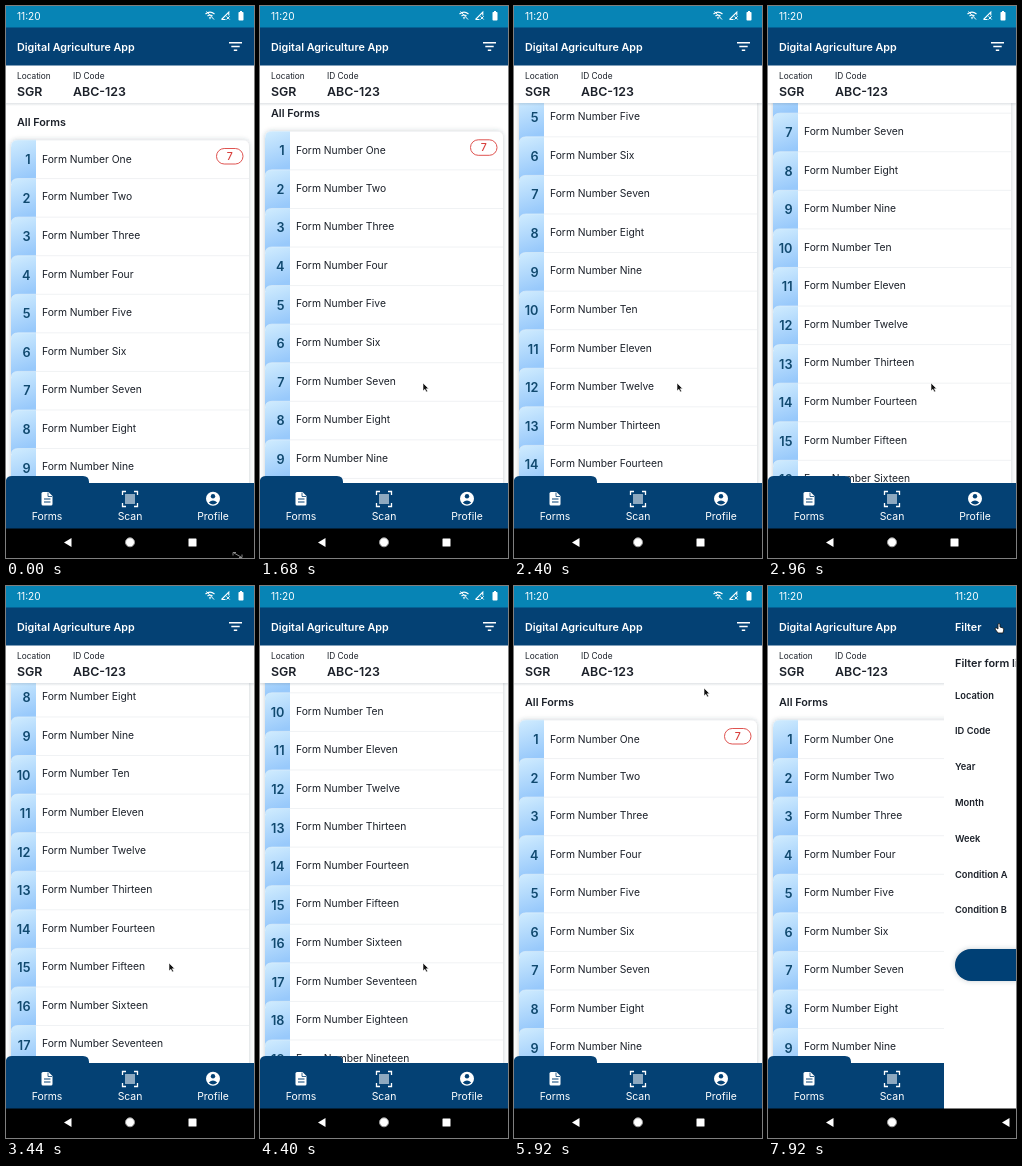
Recreate the animation shown at these times as an HTML page. Size 248 by 552 pixels, loop 8 s.

```html
<!DOCTYPE html>
<html lang="en">
<head>
<meta charset="utf-8">
<style>
html, body { margin: 0; width: 100%; height: 100%; overflow: hidden; background: #fff; }
svg { display: block; width: 248px; height: 552px; font-family: Inter, Roboto, sans-serif; }
.b { font-weight: 600; }
</style>
</head>
<body>
<svg id="stage" viewBox="0 0 248 552"></svg>
<script>
const LOOP = 8000, STEP = 80, PITCH = 38.57;
const NAVY = '#044174', INK = '#1b2029';
const names = ('One Two Three Four Five Six Seven Eight Nine Ten Eleven Twelve Thirteen ' +
  'Fourteen Fifteen Sixteen Seventeen Eighteen Nineteen Twenty').split(' ');

const text = (x, y, size, str, fill = INK, more = '') =>
  `<text x="${x}" y="${y}" font-size="${size}" fill="${fill}" ${more}>${str}</text>`;
const bold = (x, y, size, str, fill = INK, more = '') =>
  text(x, y, size, str, fill, 'class="b" ' + more);
const rect = (x, y, w, h, fill, more = '') =>
  `<rect x="${x}" y="${y}" width="${w}" height="${h}" fill="${fill}" ${more}/>`;
const path = (d, fill, more = '') => `<path d="${d}" fill="${fill}" ${more}/>`;
const line = (d, width, color = '#fff') =>
  path(d, 'none', `stroke="${color}" stroke-width="${width}"`);

function row(name, i) {
  const y = 134 + i * PITCH;
  return rect(30, y - .5, 213, 1, '#f0f2f4') +
    path(`M5 ${y + 44}V${y + 7}q0-7 7-7H30V${y + 44}Z`, 'url(#blue)') +
    line(`M5 ${y + 7}q0-7 7-7H30`, .7, '#dcecfa') +
    bold(24.5, y + 24, 12.7, i + 1, '#10496f', 'text-anchor="end"') +
    text(36, y + (i ? 21.8 : 22.8), 10.3, 'Form Number ' + name);
}

const card = rect(5, 134, 238, PITCH * names.length, '#fff', 'rx="6" filter="url(#glow)"');

const topBars = title =>
  rect(0, 0, 248, 22, '#0784b5') + rect(0, 21.5, 248, 38, NAVY) +
  text(11, 13.6, 10.1, '11:20', '#fff') +
  line('M199.500 8q4.500-3.600 9 0M201.500 10q2.500-2 5 0', 1.2) +
  path('M202.800 11.200h2.400L204 13.500Z', '#fff') + line('M200.500 5.500l7.500 8', 1) +
  line('M215.500 13.500L222.800 6V9.500M215.500 13.500H219.500', 1.1) +
  line('M220.500 10.300l3.200 3.200m0-3.200l-3.200 3.200', 1) +
  rect(232.5, 6, 5, 8.5, '#fff', 'rx=".8"') + rect(234, 5, 2, 1.5, '#fff') +
  bold(11, 44.7, 10.75, title, '#fff');

const systemBar = rect(0, 522.5, 248, 30, '#000') +
  path('M58 536.5L65.5 532V541Z', '#fff') +
  '<circle cx="124" cy="536.3" r="4.5" fill="#fff" stroke="#999" stroke-width="1"/>' +
  rect(182.5, 532.5, 8, 8, '#fff', 'rx=".6"');

const tabLabel = (x, str) => text(x, 513.7, 10.4, str, '#fff', 'text-anchor="middle"');

const tabs = rect(0, 477, 248, 46, NAVY) +
  path('M0 523V474q1-4 6-4H77q6 0 6 6V523Z', NAVY) +
  path('M37 486h5.5l4 4v8q0 1.5-1.5 1.5h-8q-1.5 0-1.5-1.5V487.5q0-1.5 1.5-1.5Z', '#fff') +
  line('M38 493h6.5M38 496h6.5', 1.1, NAVY) + line('M42 486.5v4h4', .8, NAVY) +
  line('M116.5 489v-3.5h3.5M128 485.5h3.5V489M131.5 497v3.5H128M120 500.5h-3.5V497', 1.3) +
  rect(119, 488, 10, 10, '#fff', 'opacity=".55"') +
  '<circle cx="207" cy="492.7" r="7" fill="#fff"/>' +
  `<circle cx="207" cy="490.3" r="2.2" fill="${NAVY}"/>` +
  path('M202.8 496.4q4.2-4 8.4 0q-4.2 4-8.4 0Z', NAVY) +
  tabLabel(41, 'Forms') + tabLabel(124, 'Scan') + tabLabel(207, 'Profile');

const fields = ['Location', 'ID Code', 'Year', 'Month', 'Week', 'Condition A', 'Condition B'];
const panel = rect(0, 0, 248, 552, '#fff') + topBars('Filter') +
  bold(11, 80.9, 10.9, 'Filter form list') +
  fields.map((f, i) => bold(11, 112.5 + i * 35.8, 9.3, f)).join('') +
  rect(11, 363, 226, 32, NAVY, 'rx="16" filter="url(#glow)"') + systemBar;

const stage = document.getElementById('stage');
stage.innerHTML = `<defs>
  <linearGradient id="blue" x1=".3" y1="0" x2=".5" y2="1">
    <stop stop-color="#cdeafe"/><stop offset=".88" stop-color="#98c9fb"/></linearGradient>
  <linearGradient id="fade" x2="0" y2="1">
    <stop stop-color="#567" stop-opacity=".18"/><stop offset="1" stop-color="#567" stop-opacity="0"/></linearGradient>
  <filter id="glow" x="-10%" y="-30%" width="120%" height="160%">
    <feDropShadow dx="0" dy="0" stdDeviation="2.5" flood-color="#345" flood-opacity=".28"/></filter>
  <clipPath id="view">${rect(0, 97, 248, 426, '#fff')}</clipPath></defs>
  ${rect(0, 0, 248, 552, '#fff')}
  <g clip-path="url(#view)"><g id="list">
    ${bold(11, 119.8, 10.8, 'All Forms')}${card}${names.map(row).join('')}
    ${rect(210.5, 142.5, 26.5, 15.5, '#fff', 'rx="7.7" stroke="#df5350"')}
    ${text(223.7, 154, 10.6, '7', '#d8403d', 'text-anchor="middle" font-weight="500"')}
  </g></g>
  ${rect(0, 59, 248, 38, '#fff')}${rect(0, 97, 248, 3, 'url(#fade)')}
  ${topBars('Digital Agriculture App')}
  ${line('M223 36.8h13M225.3 40.5h8.4M227.8 44.2h3.4', 1.4)}
  ${text(11, 73, 8.3, 'Location')}${text(67, 73, 8.3, 'ID Code')}
  ${bold(11, 90, 12.4, 'SGR')}${bold(67, 90, 12.4, 'ABC-123')}
  ${tabs}${systemBar}
  <g id="panel">${panel}</g>
  <g id="arrow">${path('M0 0V8L1.9 6.3L3.2 9L4.6 8.3L3.3 5.7H5.7Z', '#111', 'stroke="#fff" stroke-width=".6"')}</g>
  <g id="hand">${path('M-1-4q1-1 2 0V-1L4 0q1 .5.7 2L4 5H-1L-4 1q0-1.5 1.5-1L-1 1Z', '#fff', 'stroke="#111" stroke-width=".8"')}</g>
  <g id="resize">${line('M227 549.5v-3h3M228 547l7 4M233 551.5h3v-3', .9, '#999')}</g>`;

// Each key is [time, value, ...]; smooth eases within a segment.
function track(keys, t, smooth) {
  const i = keys.findIndex(k => k[0] > t);
  if (i < 0) return keys[keys.length - 1].slice(1);
  if (!i) return keys[0].slice(1);
  const a = keys[i - 1], b = keys[i];
  let p = (t - a[0]) / (b[0] - a[0]);
  if (smooth) p = p * p * (3 - 2 * p);
  return a.slice(1).map((v, j) => v + (b[j + 1] - v) * p);
}

const scroll = [[1600, 0], [1680, 8.7], [2400, 196], [3440, 311.6], [4400, 374.3], [5440, 0]];
const pointer = [[80, 232, 546], [1040, 163, 377], [5360, 163, 377], [5920, 190, 102],
  [6320, 190, 102], [6960, 230, 40]];
const slide = [[7760, 248], [7840, 236], [7920, 176]];

const $ = id => document.getElementById(id);
const move = (id, x, y) => $(id).setAttribute('transform', `translate(${x} ${y})`);
const show = (id, on) => $(id).setAttribute('visibility', on ? 'visible' : 'hidden');

function draw(now) {
  const t = Math.floor(now % LOOP / STEP) * STEP;
  const [x, y] = track(pointer, t, true);
  move('list', 0, -track(scroll, t)[0]);
  move('panel', track(slide, t)[0], 0);
  move('arrow', x, y);
  move('hand', x + 1, y + 2);
  show('resize', t <= 80);
  show('arrow', t > 80 && t < 6960);
  show('hand', t >= 6960);
  requestAnimationFrame(draw);
}
draw(performance.now());
</script>
</body>
</html>
```
